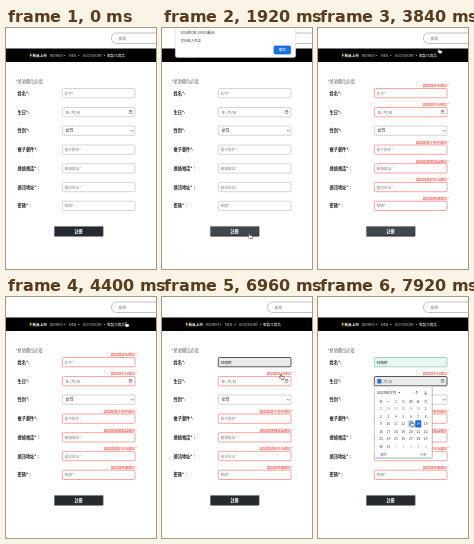
Recreate the animation shown at these times as an HTML page. Size 150x241 px, loop 8000 ms.

```html
<!DOCTYPE html>
<html lang="zh-Hant">
<head>
<meta charset="utf-8">
<style>
html, body { margin: 0; width: 100%; height: 100%; overflow: hidden; background: #fff; }
svg { display: block; width: 100vw; height: 100vh; }
text { font-family: "Noto Sans CJK TC", "Noto Sans CJK", "Noto Sans", sans-serif; white-space: pre; }
</style>
</head>
<body>
<svg id="stage" viewBox="0 0 150 241"></svg>
<script>
const LOOP = 8000;
const stage = document.getElementById('stage');

// label, placeholder, top of the input, error wording
const fields = [
  ['姓名*:', '名字*', 60.5, '姓名'],
  ['生日*:', '年 /月/日', 79.5, '生日'],
  ['性別*:', '女性', 98, ''],
  ['電子郵件*:', '電子郵件*', 117, '電子郵件'],
  ['連絡電話*：', '連絡電話*', 135.7, '連絡電話'],
  ['通訊地址*：', '通訊地址*', 154.4, '通訊地址'],
  ['密碼*：', '密碼*', 173.2, '密碼']
];
const menu = [[26.5, '新品上市', 700], [44, 'WOMEN', 400, 57.5], [63, 'MEN', 400, 72],
  [77, 'ACCESSORY', 400, 97.5], [101, '客製化商品', 500]];

// pointer path: time, x, y
const path = [[160, 150, 6], [880, 86.5, 205], [1920, 86.5, 205], [2480, 114, 79],
  [2720, 118, 58], [3360, 120, 20], [3840, 120, 20], [4400, 119, 24.5], [4480, 119, 26],
  [4680, 92, 64], [6700, 98, 66], [6960, 118, 77], [7200, 124, 83], [7360, 124, 83],
  [7840, 92.5, 124], [8000, 92.5, 124]];

const clamp = v => Math.max(0, Math.min(1, v));
const ease = v => v * v * (3 - 2 * v);
const fade = (t, start, ms) => ease(clamp((t - start) / ms));
const mix = (a, b, k) => `rgb(${a.map((v, i) => Math.round(v + (b[i] - v) * k))})`;

const rect = (x, y, w, h, fill, more = '') =>
  `<rect x="${x}" y="${y}" width="${w}" height="${h}" fill="${fill}" ${more}/>`;
const text = (x, y, s, size, fill, more = '') =>
  `<text x="${x}" y="${y}" font-size="${size}" fill="${fill}" ${more}>${s}</text>`;
const line = (d, color, w = 0.5) => `<path d="${d}" fill="none" stroke="${color}" stroke-width="${w}"/>`;
const border = (color, w, r = 1) => `stroke="${color}" stroke-width="${w}" rx="${r}"`;
const middle = 'text-anchor="middle"';

function header() {
  let s = rect(105.5, 5, 60, 10.5, '#fff', border('#999', 0.6, 5.2)) + text(112.5, 11.7, '搜尋', 3.8, '#777');
  s += rect(0, 20.5, 150, 13.5, '#000');
  s += '<path d="M25.2 24.8L23.3 27.6H24.6L24 29.8L26.2 26.8H24.9Z" fill="#fc3"/>';
  for (const [x, label, weight, arrow] of menu) {
    const color = weight > 400 ? '#fff' : '#ccc';
    s += text(x, 28.8, label, weight > 400 ? 3.6 : 3.4, color, `font-weight="${weight}"`);
    if (arrow) s += `<path d="M${arrow} 26.9h1.8l-.9 1.1z" fill="#ccc"/>`;
  }
  return s;
}

function field([label, hint, y, error], i, t) {
  const focusName = t >= 5120 && t < 7240, focusDate = t >= 7240;
  const wrong = error && t >= 3840 && !(i === 0 && t >= 6400);
  let fill = '#fff', edge = wrong ? '#f56a62' : '#bbb', w = 0.6;
  if ((i === 0 && focusName) || (i === 1 && focusDate)) {
    const k = fade(t, i ? 7240 : 5120, 160);
    fill = mix([255, 255, 255], [235, 235, 235], k);
    edge = '#444';
    w = 0.9;
  } else if (i === 0 && focusDate) {
    fill = '#e8f8f1';
    edge = '#62bd96';
  }
  let s = text(11.5, y + 6.2, label, 4.2, '#222', 'font-weight="700"');
  s += rect(56.3, y, 72.7, 9.3, fill, border(edge, w));
  if (i === 1 && focusDate) s += rect(59.3, y + 2.5, 4, 4.5, '#1a73e8');
  const name = '林曉明'.slice(0, Math.max(0, Math.floor((t - 6160) / 120) + 1));
  const typed = i === 0 && t >= 6160;
  s += text(i === 1 || i === 2 ? 59.5 : 58.5, y + 6.1, typed ? name : hint, i === 2 ? 4 : 3.7,
    typed || i === 2 ? '#333' : i === 1 ? '#666' : '#888');
  if (i === 1) {
    s += rect(123.3, y + 3.2, 2.7, 2.8, 'none', border('#444', 0.4, 0.2)) + line(`M123.3 ${y + 3.6}h2.7`, '#444', 0.6);
  }
  if (i === 2) s += line(`M125 ${y + 4.1}l1.2 1.2l1.2-1.2`, '#333', 0.6);
  if (wrong) s += text(131, y - 1.2, `請填寫${error}欄位*`, 3.5, '#f02c24', 'text-anchor="end"');
  return s;
}

function button(t) {
  const k = fade(t, 780, 150) * (1 - fade(t, 3840, 150));
  return rect(48.4, 198.4, 48.4, 9.6, mix([36, 42, 46], [66, 71, 75], k), border('#6b7074', 0.5, 0.3)) +
    line('M48.6 208H96.8V198.6', '#16191b', 0.8) +
    text(72.6, 204.9, '註冊', 4.2, '#fff', middle + ' font-weight="700"');
}

function dialog() {
  return rect(13.3, -4, 120.4, 33.5, '#fff', border('#ccc', 0.4, 2)) +
    text(18.5, 6.3, 'localhost:3000 顯示', 3.8, '#333') +
    text(18.5, 13.8, '資料輸入有誤', 3.4, '#555') +
    rect(112, 18, 16.6, 8, '#1a73e8', border('#0b57d0', 0.7, 1.2)) +
    text(120.3, 23.4, '確定', 3.6, '#fff', middle + ' font-weight="500"');
}

function calendar(t) {
  let s = rect(57, 90, 58, 72, '#000', 'rx="1" opacity=".15"') +
    rect(56.5, 89.3, 57.6, 71.5, '#fff', border('#aaa', 0.5, 0.8));
  s += text(59, 97, '2023年07月', 3.6, '#222', 'font-weight="500"') + '<path d="M80.3 95h2l-1 1.2z" fill="#333"/>';
  s += line('M97.2 95.6l1.5-1.5l1.5 1.5M98.7 94.2v3.4M106 96l1.5 1.5l1.5-1.5M107.5 94v3.4', '#444', 0.45);
  for (let i = 0; i < 49; i++) {
    const x = 63 + i % 7 * 7.45, y = 104.4 + Math.floor(i / 7) * 7.5;
    const n = i - 12;                       // the 1st falls on a Saturday
    const inside = n > 0 && n < 32;
    const day = n < 1 ? n + 30 : n > 31 ? n - 31 : n;
    if (n === 14) s += rect(x - 3, y - 3.6, 6, 7.2, '#1a66d8', 'rx=".6"');
    if (n === 13 && t >= 7800) s += rect(x - 3, y - 3.6, 6, 7.2, '#c5d8f5', 'rx=".6"');
    s += text(x, y + 1.2, i < 7 ? '日一二三四五六'[i] : day, 3.3,
      n === 14 ? '#fff' : inside || i < 7 ? '#333' : '#999', middle);
  }
  return s + text(62, 158.8, '清除', 3.3, '#1a73e8') + text(102, 158.8, '今天', 3.3, '#1a73e8');
}

function pointer(t) {
  if (t < 160 || (t >= 4680 && t < 6700)) return '';
  const i = path.findIndex(p => p[0] > t);
  const [t0, x0, y0] = path[i - 1], [t1, x1, y1] = path[i];
  const k = ease((t - t0) / (t1 - t0));
  return `<path transform="translate(${x0 + (x1 - x0) * k} ${y0 + (y1 - y0) * k})"
    d="M.3 .6Q.9-.3 1.4 .6V2.3L3.8 2.8Q4.3 3 4.2 3.7L3.6 5.6H1.2L-.6 3.6Q-.6 2.8 .3 3.2Z"
    fill="#fff" stroke="#222" stroke-width=".55" stroke-linejoin="round"/>`;
}

function draw(now) {
  const t = now % LOOP;
  stage.innerHTML = rect(0, 0, 150, 241, '#fff') + header() +
    text(9.5, 54.9, '*星號欄位必填', 4.2, '#666') +
    fields.map((f, i) => field(f, i, t)).join('') + button(t) +
    (t >= 1760 && t < 3840 ? dialog() : '') +
    (t >= 7320 ? calendar(t) : '') + pointer(t);
  requestAnimationFrame(() => draw(performance.now() - start));
}
const start = performance.now();
draw(0);
</script>
</body>
</html>
```
